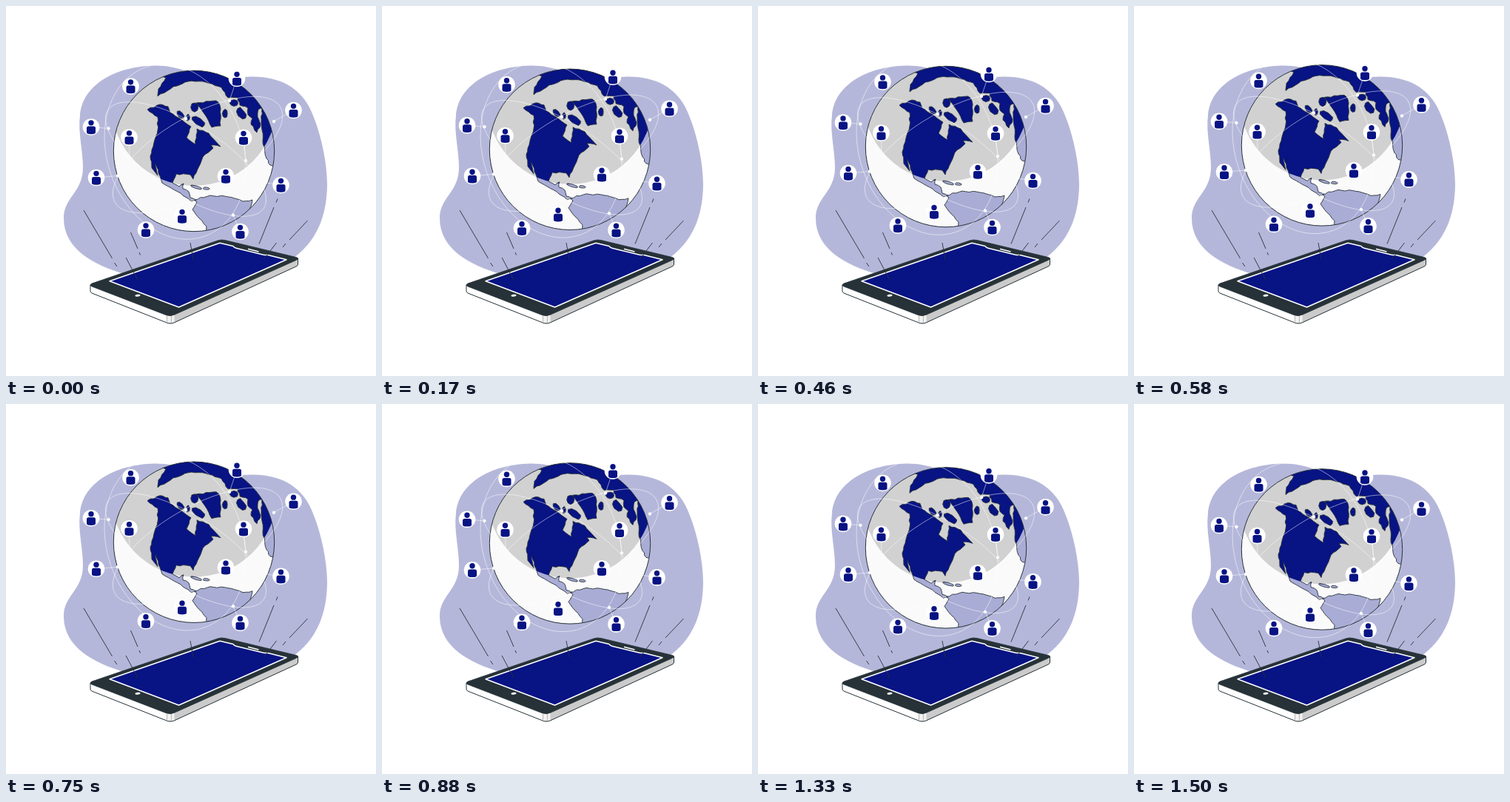
Animation of 500x500 px, one loop 1.54 s. Source, as an HTML page with a canvas:

```html
<!DOCTYPE html>
<html lang="en">
<head>
<meta charset="utf-8">
<title>Connected world</title>
<style>
html, body { margin: 0; width: 100%; height: 100%; overflow: hidden; background: #fff; }
canvas { display: block; width: 500px; height: 500px; }
</style>
</head>
<body>
<canvas id="stage" width="500" height="500"></canvas>
<script>
const canvas = document.getElementById('stage');
const ctx = canvas.getContext('2d');
const ratio = window.devicePixelRatio || 1;
canvas.width = canvas.height = 500 * ratio;

const LOOP = 1540, STEPS = 37, RISE = 10, LINK_REACH = 36;
const NAVY = '#081384', PALE = '#a9acd5', BLOB = '#b5b7da', INK = '#263238', GRAY = '#d1d1d1';
const GLOBE = { x: 254, y: 196, r: 108.7 };
const rad = degrees => degrees * Math.PI / 180;

let seed = 7;
function jitter(size) {
  seed = seed * 16807 % 2147483647;
  return (seed / 2147483647 * 2 - 1) * size;
}

// Closed outline through key points, with seeded ragged edges between them
function coast(points, roughness = 0.9, stride = 5) {
  const path = new Path2D();
  points.forEach(([x, y], i) => {
    const [nextX, nextY] = points[(i + 1) % points.length];
    const length = Math.hypot(nextX - x, nextY - y);
    const parts = Math.ceil(length / stride);
    path.lineTo(x, y);
    for (let k = 1; k < parts; k++) {
      const off = jitter(roughness) / length;
      path.lineTo(x + (nextX - x) * k / parts - (nextY - y) * off,
                  y + (nextY - y) * k / parts + (nextX - x) * off);
    }
  });
  path.closePath();
  return path;
}

const parse = text => text.split(',').map(pair => pair.trim().split(' ').map(Number));

function island(x, y, rx, ry, tilt = 0) {
  const cos = Math.cos(rad(tilt)), sin = Math.sin(rad(tilt)), points = [];
  for (let i = 0; i < 8; i++) {
    const u = Math.cos(i * Math.PI / 4) * rx * (1 + jitter(0.15));
    const v = Math.sin(i * Math.PI / 4) * ry * (1 + jitter(0.15));
    points.push([x + u * cos - v * sin, y + u * sin + v * cos]);
  }
  return coast(points, 0);
}

const northAmerica = `191 140, 208 133, 219 136, 222 144, 235 152, 250 163, 244 178, 256 187,
  258 166, 274 172, 290 190, 277 188, 280 192, 266 204, 253 234, 249 228, 230 227, 225 239, 234 244,
  240 240, 239 247, 247 251, 249 259, 257 262, 250 264, 236 253, 211 239, 202 213, 205 229, 197 219,
  195 203, 205 168, 205 150`;
const arctic = `204 90, 216 97, 206 112, 205 122, 226 109, 246 102, 270 103, 291 110, 300 124, 313 124,
  316 134, 327 138, 327 147, 333 152, 331 160, 339 171, 344 160, 340 150, 341 140, 346 138, 345 153,
  347 182, 352 206, 357 215, 366 216, 390 150, 330 70, 230 70`;
const southAmerica = `254 262, 276 256, 300 258, 320 264, 333 262, 329 275, 320 310, 272 310, 271 298,
  252 275, 258 265`;
const greenland = '257 131, 284 128, 289 134, 290 162, 278 164, 266 143';

const lands = [
  ...[northAmerica, arctic, southAmerica, greenland].map(text => coast(parse(text))),
  island(255, 137, 5, 6),
  island(260, 156, 11, 4.5, 35),
  island(236, 147, 6, 3.5, 45),
  island(246, 151, 2.5, 4.5),
  island(296, 145, 3.5, 6),
  island(308, 131, 6, 4),
  island(318, 145, 9, 5, 50),
  island(257, 245, 9, 1.7, 16),
  island(270.5, 246.5, 4.2, 1.8, 5)
];

const blob = new Path2D(`M200 80.5 C232 80 250 92 280 99 C300 100 308 95.5 335 95.5
  C370 96 396 110 410 137 C425 167 434 212 434 240 C434 285 419 320 385 343 L250 380
  L160 362 C118 350 78 328 78 287 C78 258 104 252 104 218 C104 195 97 170 100 148
  C103 108 145 82 200 80.5Z`);
const rays = new Path2D(`M105 276L143.5 341 M146.5 347L150 352 M168.5 306L178 328 M180 333L181.5 336.5
  M162 340L178 370 M249 320L253 342 M367 260.5L365 265.5 M362 272L342 321.5
  M407.5 290L383 316 M378 321L374 326 M365.5 320L349 341.5`);

const users = parse(`168.5 108.5, 115 163.5, 166.5 177.5, 122 232, 312 98, 388.5 141,
  321 178, 297 230, 371.5 242, 316.5 305, 238 284, 189 302.5`);
const nodes = parse(`138.5 165.5, 151 229.5, 302 128, 362 156, 345 238, 307 282.5,
  324 209, 243 152, 319 250, 167 207.5`);
const orbits = [
  { x: 243, y: 207, a: 124.5, b: 47.5, tilt: 32 },
  { x: 259, y: 201, a: 129, b: 52, tilt: -30 },
  { x: 228.5, y: 197, a: 121, b: 92, tilt: 71 }
];

function disc(x, y, r, fill) {
  ctx.beginPath();
  ctx.arc(x, y, r, 0, Math.PI * 2);
  ctx.fillStyle = fill;
  ctx.fill();
}

function shape(d, fill, stroke, width = 1) {
  const path = d instanceof Path2D ? d : new Path2D(d);
  if (fill) { ctx.fillStyle = fill; ctx.fill(path); }
  if (stroke) { ctx.strokeStyle = stroke; ctx.lineWidth = width; ctx.stroke(path); }
}

function drawGlobe() {
  const { x, y, r } = GLOBE;
  ctx.save();
  disc(x, y, r, '#fafafa');
  ctx.clip();
  lands.forEach(land => shape(land, PALE));
  ctx.save();
  disc(x, 131, 112, GRAY);
  ctx.clip();
  lands.forEach(land => shape(land, NAVY));
  ctx.restore();
  lands.forEach(land => shape(land, null, INK, 0.9));
  ctx.restore();
  ctx.beginPath();
  ctx.arc(x, y, r, 0, Math.PI * 2);
  ctx.strokeStyle = INK;
  ctx.lineWidth = 1;
  ctx.stroke();
}

// Each user connects to the closest node within reach
function linkUser([x, y]) {
  const distance = ([nx, ny]) => Math.hypot(nx - x, ny - y);
  const nearest = nodes.reduce((best, node) => distance(node) < distance(best) ? node : best);
  if (distance(nearest) > LINK_REACH) return;
  ctx.beginPath();
  ctx.moveTo(x, y);
  ctx.lineTo(...nearest);
  ctx.stroke();
}

function drawNetwork() {
  ctx.strokeStyle = 'rgba(255,255,255,.65)';
  ctx.lineWidth = 0.8;
  for (const { x, y, a, b, tilt } of orbits) {
    ctx.beginPath();
    ctx.ellipse(x, y, a, b, rad(tilt), 0, Math.PI * 2);
    ctx.stroke();
  }
  users.forEach(linkUser);
  nodes.forEach(([x, y]) => disc(x, y, 2.2, '#fafafa'));
}

function drawUser([x, y]) {
  disc(x, y, 11.3, '#fff');
  disc(x, y - 5.6, 3.7, NAVY);
  ctx.save();
  ctx.translate(x, y);
  shape('M-6 1.5 Q-6-1-3.5-1 L3.5-1 Q6-1 6 1.5 L6 7.5 Q5.5 9.7 0 9.7 Q-5.5 9.7-6 7.5Z', NAVY);
  ctx.restore();
}

function drawPhone() {
  shape('M114 377 L222 418 222 429 Q219 429 216 427.5 L116 388 Q114 387 114 385Z', '#fff', INK);
  shape('M222 418 L394.5 341 394.5 349 Q394.5 351 392 352 L227 428 Q224 429 222 429Z', '#cbcbcb', INK);
  shape('M217.5 418 L227.5 416 227.5 427 Q222 429.5 217.5 427Z', '#f2f2f2');
  shape('M217.5 418 V427 M223.5 418 V428', null, '#bdbdbd', 1.2);
  shape(`M116 375 L286 317 Q291 315.3 296 316.5 L392 339.5 Q397 341 392 343.5
    L228 417 Q222 420 216 417.5 L116 379 Q112 377 116 375Z`, INK, INK, 0.8);
  shape(`M140 371.7 L289 320.3 307 324.6 Q308 326.5 311 327.2 L347 336 Q351 336.8 354 336.4
    L379 342.8 233.5 407Z`, NAVY, '#fff', 1.5);
  shape('M327 328.3 L341.5 332', null, '#fff', 1.5);
  ctx.beginPath();
  ctx.ellipse(178, 391.2, 3.6, 1.5, -0.1, 0, Math.PI * 2);
  ctx.fillStyle = '#fff';
  ctx.fill();
}

// Linear float up and down, advanced at 24 steps per second
function lift(time) {
  const step = Math.floor((time % LOOP + 6) / LOOP * STEPS) % STEPS;
  return RISE * (Math.abs(step - 17.5) / 18.5 - 1);
}

function draw(time) {
  ctx.setTransform(ratio, 0, 0, ratio, 0, 0);
  ctx.lineJoin = 'round';
  ctx.fillStyle = '#fff';
  ctx.fillRect(0, 0, 500, 500);
  shape(blob, BLOB);
  drawPhone();
  shape(rays, null, INK, 0.9);
  ctx.save();
  ctx.translate(0, lift(time) + 0.5);
  drawGlobe();
  drawNetwork();
  users.forEach(drawUser);
  ctx.restore();
}

const start = performance.now();
function tick() {
  draw(performance.now() - start);
  requestAnimationFrame(tick);
}
tick();
</script>
</body>
</html>
```
